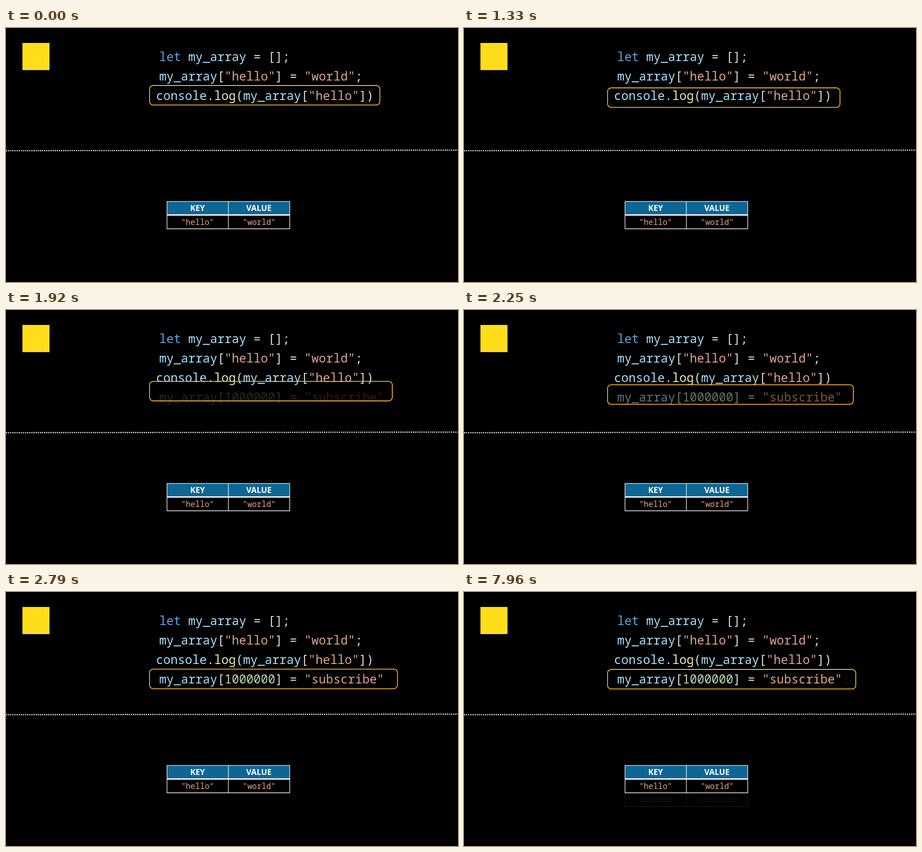
Recreate the animation shown at these times as an HTML page. Size 998 by 561 pixels, loop 8 s.

```html
<!DOCTYPE html>
<html lang="en">
<head>
<meta charset="utf-8">
<title>Array keys</title>
<style>
  html, body { margin: 0; width: 100%; height: 100%; overflow: hidden; background: #000; }
  svg { display: block; width: 100%; height: 100%; }
  .code { font: 26.7px "Noto Sans Mono", monospace; white-space: pre; }
  .cell { font-size: 17.4px; text-anchor: middle; }
  .head { font: bold 17.6px "Open Sans", sans-serif; text-anchor: middle; fill: #fff; }
  .grid { fill: none; stroke: #fff; stroke-width: 1.3; }
</style>
</head>
<body>
<svg id="stage" viewBox="0 0 998 561">
  <rect x="36.3" y="33" width="59.7" height="60" fill="#ffdd1a"/>
  <path d="M0 271L998 269.7" stroke="#fff" stroke-width="2.6" stroke-dasharray="2.34"/>

  <rect x="355" y="383" width="272" height="30" fill="#0e6694"/>
  <path class="grid" d="M355.5 383.2H626.5V443.5H355.5ZM491 383V443.5"/>
  <path class="grid" style="stroke-width:3" d="M355 413H627"/>
  <text class="head" x="423" y="404.3">KEY</text>
  <text class="head" x="558.5" y="404.3">VALUE</text>

  <g id="code"></g>
  <g id="assignment"></g>
  <g id="nextStep" opacity=".09">
    <path class="grid" d="M355.5 444V474H626.5V444M491 444V474"/>
  </g>
  <rect id="highlight" x="317" height="43.2" rx="8" fill="none" stroke="#fdb92c" stroke-width="1.8"/>
</svg>
<script>
const SVG = "http://www.w3.org/2000/svg";
const LOOP = 8000;
const byId = id => document.getElementById(id);
const highlight = byId("highlight");
const assignment = byId("assignment");
const nextStep = byId("nextStep");

function tokenColor(token) {
  if (token[0] === '"') return "#e0a68c";
  if (token === "let") return "#5ba6df";
  if (token === "log") return "#ebebb8";
  if (/^\d/.test(token)) return "#c5dcb8";
  return /^\w/.test(token) ? "#a8e2ff" : "#dedede";
}

function addCode(parent, x, y, source, extraClass = "") {
  const text = document.createElementNS(SVG, "text");
  text.setAttribute("class", "code " + extraClass);
  text.setAttribute("x", x);
  text.setAttribute("y", y);
  for (const token of source.match(/"[^"]*"|\w+|[^\w"]+/g)) {
    const span = document.createElementNS(SVG, "tspan");
    span.textContent = token;
    span.setAttribute("fill", tokenColor(token));
    text.append(span);
  }
  parent.append(text);
}

addCode(byId("code"), 338.3, 73, "let my_array = [];");
addCode(byId("code"), 338.3, 116, 'my_array["hello"] = "world";');
addCode(byId("code"), 331.3, 158.7, 'console.log(my_array["hello"])');
addCode(byId("code"), 423, 434.7, '"hello"', "cell");
addCode(byId("code"), 559, 434.7, '"world"', "cell");
addCode(assignment, 338.3, 201.6, 'my_array[1000000] = "subscribe"');
addCode(nextStep, 835, 201.6, ";");
addCode(nextStep, 423, 465, "1000000", "cell");
addCode(nextStep, 559, 465, '"subscribe"', "cell");

const progress = (t, start, end) => Math.min(1, Math.max(0, (t - start) / (end - start)));
const smooth = p => p * p * (3 - 2 * p);
const mix = (a, b, p) => a + (b - a) * p;

// Cubic Bezier (0.25, 0.1, 0.25, 1), solved for x by bisection.
function ease(x) {
  const bezier = (a, b, s) => 3 * a * s * (1 - s) ** 2 + 3 * b * s * s * (1 - s) + s ** 3;
  let low = 0, high = 1;
  for (let i = 0; i < 24; i++) {
    const mid = (low + high) / 2;
    if (bezier(.25, .25, mid) < x) low = mid; else high = mid;
  }
  return bezier(.1, 1, high);
}

function draw() {
  const t = performance.now() % LOOP;
  const move = ease(progress(t, 1100, 3110));
  highlight.setAttribute("y", mix(127, 171, move));
  highlight.setAttribute("width", mix(508.5, 548, move));
  assignment.setAttribute("opacity", smooth(progress(t, 1560, 2900)));
  nextStep.setAttribute("visibility", t >= 7960 ? "visible" : "hidden");
  requestAnimationFrame(draw);
}
draw();
</script>
</body>
</html>
```
